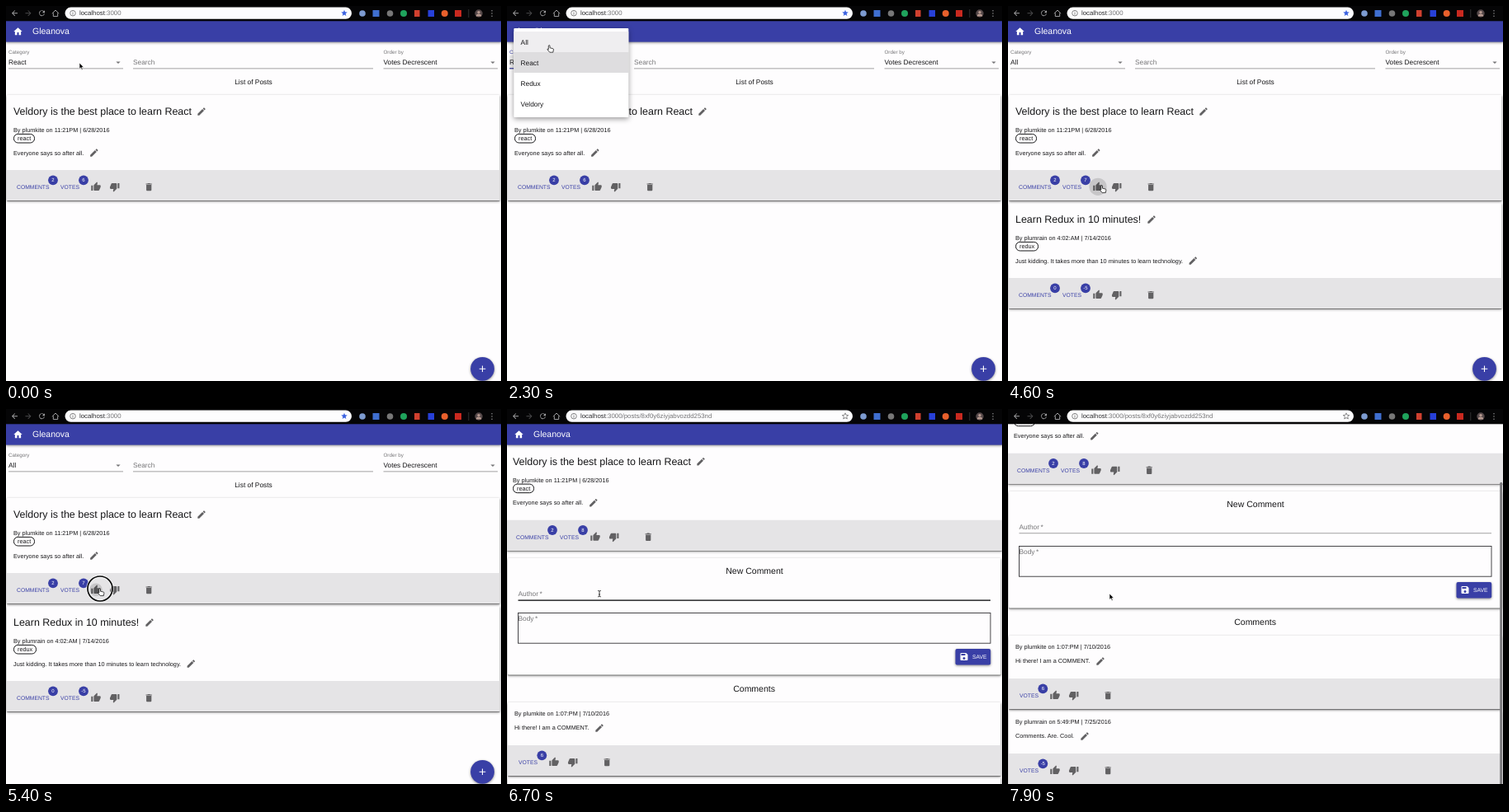
An HTML page for the animation above (8000 ms loop, 600 by 455 pixels).

```html
<!DOCTYPE html>
<html lang="en">
<head>
<meta charset="utf-8">
<title>Post list</title>
<style>
html, body { margin: 0; width: 100%; height: 100%; overflow: hidden; background: #fefdfe; }
svg { display: block; width: 600px; height: 455px; font-family: "Liberation Sans", Arial, Helvetica, sans-serif; }
text { white-space: pre; text-rendering: geometricPrecision; }
.card { fill: #fefdfe; filter: drop-shadow(0 1px .6px rgba(0,0,0,.35)) drop-shadow(0 1.2px 1.6px rgba(0,0,0,.42)); }
.raised { filter: drop-shadow(0 1.6px 1.6px rgba(0,0,0,.45)); }
</style>
</head>
<body>
<svg id="stage" viewBox="0 0 600 455" xmlns="http://www.w3.org/2000/svg"></svg>
<script>
const LOOP = 8000;
const INDIGO = '#393fa6', INK = '#161618', GREY = '#757577', ICON = '#626163';
const SMALL = 7.27, FIELD = 8.3, BUTTON = 6.77, HEAD = 12.46;

const ICONS = {
  up: 'M1 21h4V9H1zM23 10c0-1.1-.9-2-2-2h-6.3l1-4.9-.5-1.1L14.2 1 7.6 7.6Q7 8.2 7 9v10c0 1.1.9 2 2 2h9q1.3 0 1.84-1.22l3-7q.16-.4.16-.78z',
  edit: 'M3 17.25V21h3.75L17.81 9.94l-3.75-3.75zM20.7 7q.6-.7 0-1.4l-2.3-2.3q-.7-.6-1.4 0l-1.85 1.85 3.75 3.75z',
  trash: 'M6 19q0 2 2 2h8q2 0 2-2V7H6zM19 4h-3.5l-1-1h-5l-1 1H5v2h14z',
  home: 'M10 20v-6h4v6h5v-8h3L12 3 2 12h3v8z',
  save: 'M17 3H5q-2 0-2 2v14q0 2 2 2h14q2 0 2-2V7zM12 19a3 3 0 1 1 0-6 3 3 0 0 1 0 6zM15 9H5V5h10z',
  back: 'M20 11H7.8l5.6-5.6L12 4l-8 8 8 8 1.4-1.4L7.8 13H20z',
  reload: 'M17.65 6.35A8 8 0 1 0 19.73 14h-2.08A6 6 0 1 1 16.22 7.78L13 11h7V4z',
  star: 'M12 17.3 18.2 21l-1.7-7 5.5-4.8-7.2-.6L12 2 9.2 8.6 2 9.2 7.5 14 5.8 21z'
};

const text = (x, y, size, str, fill = INK, extra = '') =>
  `<text x="${x}" y="${y}" font-size="${size}" fill="${fill}" ${extra}>${str}</text>`;
const rect = (x, y, w, h, fill, extra = '') =>
  `<rect x="${x}" y="${y}" width="${w}" height="${h}" fill="${fill}" ${extra}/>`;
const disc = (x, y, r, fill, extra = '') =>
  `<circle cx="${x}" cy="${y}" r="${r}" fill="${fill}" ${extra}/>`;
const group = (id, body, extra = '') => `<g id="${id}" ${extra}>${body}</g>`;
const icon = (name, x, y, fill = ICON, size = 12.5, turn = 0, extra = '') =>
  `<path d="${ICONS[name]}" fill="${fill}" fill-rule="evenodd" ${extra}
    transform="translate(${x} ${y}) rotate(${turn}) scale(${size / 24}) translate(-12 -12)"/>`;
const middle = 'text-anchor="middle"';

const badge = (x, y, value, id = '') => disc(x, y, 5.9, INDIGO) +
  text(x, y + 2.1, 6, value, '#fff', middle + (id && ` id="${id}"`));
const voteIcons = (x, y) => icon('up', x, y) + icon('up', x + 22.7, y + .5, ICON, 12.5, 180) + icon('trash', x + 64.2, y + .3);
const chip = (y, label) =>
  rect(9.5, y, 25 + (label === 'redux' ? 2 : 0), 10.6, 'none', `rx="5" stroke="${INK}"`) +
  text(14, y + 7.6, SMALL, label);

function post(p, x = 1, w = 597.5) {
  return rect(x, 108, w, 128, '', 'class="card" rx="1"') + rect(x, 199, w, 37, '#e5e4e6') +
    text(9, 132, HEAD, p.title) + icon('edit', p.titlePen, 128) +
    text(9, 153, SMALL, p.by) + chip(155.4, p.tag) +
    text(9, 180.5, SMALL, p.body) + icon('edit', p.bodyPen, 178) +
    text(13, 222.4, BUTTON, 'COMMENTS', INDIGO) + badge(57, 211.3, p.comments) +
    text(66, 222.4, BUTTON, 'VOTES', INDIGO) + badge(94, 211.3, p.votes, p.id) + voteIcons(109, 219.3);
}

function comment(y, by, body, pen, votes) {
  return group('', rect(1, 356, 597.5, 89, '', 'class="card" rx="1"') + rect(1, 408, 597.5, 37, '#e5e4e6') +
    text(9, 372.3, SMALL, by) + text(9, 389.4, SMALL, body) + icon('edit', pen, 387) +
    text(14, 431.3, BUTTON, 'VOTES', INDIGO) + badge(42.3, 420.3, votes) + voteIcons(57, 428.3),
    `transform="translate(0 ${y})"`);
}

const first = {
  title: 'Veldory is the best place to learn React', titlePen: 237, by: 'By plumkite on 11:21PM | 6/28/2016',
  tag: 'react', body: 'Everyone says so after all.', bodyPen: 106.8, comments: 2, votes: 6
};
const second = {
  title: 'Learn Redux in 10 minutes!', titlePen: 174, by: 'By plumrain on 4:02:AM | 7/14/2016',
  tag: 'redux', body: 'Just kidding. It takes more than 10 minutes to learn technology.', bodyPen: 224.3, comments: 0, votes: -5
};

const caret = x => `<path d="M${x - 2.6} 67.5h5.2l-2.6 2.6z" fill="#757577"/>`;
const underline = (x, w) => rect(x, 75.5, w, .8, '#8b8a8c');
const appBar = rect(0, 18, 600, 25.6, INDIGO, 'class="raised"') +
  icon('home', 14.5, 31, '#fff') + text(32, 34.3, 10.5, 'Gleanova', '#fff');

const fields =
  rect(3, 60, 139, 16, '#eeedef', 'id="selectBg"') +
  text(3, 57.7, 6.25, 'Category', GREY, 'id="catLabel"') + text(3, 71, FIELD, 'React', INK, 'id="category"') +
  caret(136) + underline(3, 139) + rect(3, 75.2, 139, 1.1, INDIGO, 'id="focusLine"') +
  text(154, 71.3, FIELD, 'Search', GREY) + underline(154, 291) +
  text(457.5, 57.7, 6.25, 'Order by', GREY) + text(457.5, 71, FIELD, 'Votes Decrescent') + caret(590) + underline(457.5, 138.5) +
  text(300, 95, 8.4, 'List of Posts', INK, middle);

const menu = rect(8.3, 27, 139, 108, '#fff', 'rx="1" style="filter:drop-shadow(0 2px 3px rgba(0,0,0,.4))"') +
  rect(8.3, 56, 139, 25, '#dedddf') + rect(8.3, 31, 139, 25, '#efeef0', 'id="menuHover"') +
  ['All', 'React', 'Redux', 'Veldory'].map((s, i) => text(16.6, 46.5 + 25 * i, FIELD, s)).join('');

const listPage = appBar + fields +
  group('lower', post(second), 'transform="translate(0 131)"') + post({ ...first, id: 'votes' }) +
  disc(109, 219.3, 12, '#000', 'id="ripple"') +
  disc(577.5, 440.3, 14.4, INDIGO, 'class="raised"') +
  `<path d="M573.7 440.3h7.6M577.5 436.5v7.6" stroke="#fff" stroke-width="1.1"/>` +
  group('menu', menu);

const postPage =
  group('', post({ ...first, votes: 8 }, 2, 600), 'transform="translate(-2 -64.3)"') + appBar +
  rect(1, 181, 597.5, 141.5, '', 'class="card" rx="1"') + text(300, 200.3, 10.5, 'New Comment', INK, middle) +
  text(13.5, 227.3, FIELD, 'Author\u2009*', GREY) + rect(13.5, 231.4, 572.5, 1, INK, 'id="authorLine"') +
  rect(13.5, 247.5, 572.5, 36.7, 'none', 'stroke="#333235" stroke-width=".9"') +
  text(13.5, 256.8, FIELD, 'Body\u2009*', GREY) +
  rect(543.5, 291, 42.7, 19.6, INDIGO, 'rx="2" class="raised"') +
  icon('save', 554, 300.6, '#fff', 12) + text(564, 303.3, BUTTON, 'SAVE', '#fff') +
  text(299.6, 343, 10.5, 'Comments', INK, middle) +
  comment(91, 'By plumrain on 5:49:PM | 7/25/2016', 'Comments. Are. Cool.', 93, -5) +
  comment(0, 'By plumkite on 1:07:PM | 7/10/2016', 'Hi there! I am a COMMENT.', 112, 6);

const extensions = disc(432, 9, 3.8, '#7d9bd0') + rect(444.5, 5, 8, 8, '#3f6fd0') +
  disc(465.5, 9, 3.8, '#777') + disc(482, 9, 4, '#1fa35c') + rect(495, 5, 6.5, 8, '#d0402f') +
  rect(511.5, 5, 7.5, 8, '#2740d8') + disc(531.7, 9, 4, '#e8602c') + rect(544, 5, 8, 8, '#c9291f');
const toolbar = rect(0, 0, 600, 18.3, '#050506') +
  icon('back', 10.5, 8.7, '#a3a3a5', 10.5) + icon('back', 27, 8.7, '#4b4b4d', 10.5, 180) + icon('reload', 43.5, 8.7, '#a3a3a5', 10.5) +
  `<path d="M56 9.2 60 5l4 4.2M57.3 8.5v4.1h5.4V8.5" fill="none" stroke="#a3a3a5"/>` +
  rect(71.5, 1.6, 347.5, 14.2, '#fdfdfe', 'rx="7.1"') +
  disc(81, 8.7, 3.3, 'none', 'stroke="#666" stroke-width=".8"') + rect(80.6, 8.1, .8, 2.5, '#666') + rect(80.6, 6.6, .8, .9, '#666') +
  `<text x="89" y="11.3" font-size="7.83" fill="#2c2c2e">localhost<tspan id="path" fill="#727274"></tspan></text>` +
  icon('star', 410, 8.6, '#3b62e0', 9, 0, 'id="star"') + extensions +
  rect(560.5, 4, .7, 10, '#444') + disc(573, 9, 4.7, '#55494a') + disc(573, 7.6, 1.7, '#b79a90') +
  `<path d="M569.8 12.4a3.2 3 0 0 1 6.4 0z" fill="#b79a90"/>` +
  [5.8, 9, 12.2].map(y => disc(589, y, .7, '#a3a3a5')).join('');

const pointer =
  group('arrow', `<path d="M0 0v7.3l1.7-1.5 1.2 2.7 1.2-.5-1.2-2.7h2.3z" fill="#000" stroke="#fff" stroke-width=".6"/>`) +
  group('hand', `<path d="M-1.2 .5Q-.3-.7.5.5V3.2l3.7.9q.8.2.7 1.2L4.3 8.6H.3L-2.6 5.3q-.1-1 .7-.7l.7.6z" fill="#fff" stroke="#000" stroke-width=".7"/>`) +
  group('beam', `<path d="M-1.8-3.6Q0-3.6 0-2.6 0-3.6 1.8-3.6M0-2.6V2.8M-1.8 3.8Q0 3.8 0 2.8 0 3.8 1.8 3.8M-.9 1h1.8" fill="none" stroke="#222" stroke-width=".9"/>`);

const $ = id => document.getElementById(id);
$('stage').innerHTML = rect(0, 0, 600, 455, '#fefdfe') + group('list', listPage) + group('detail', postPage) +
  rect(596.2, 19, 3, 374, '#7a797c', 'id="scrollbar" rx="1.5"') + toolbar +
  group('pointer', group('press', disc(0, 0, 15, 'none', 'stroke="#fff" stroke-width="3.4" stroke-opacity=".75"') +
    disc(0, 0, 15, 'none', 'stroke="#0a0a0a" stroke-width="1.7"')) + pointer);

const clamp = v => Math.max(0, Math.min(1, v));
const smooth = v => v * v * (3 - 2 * v);
const within = (t, a, b) => t >= a && t < b;
const show = (id, on) => $(id).setAttribute('display', on ? 'inline' : 'none');
const set = (id, name, value) => $(id).setAttribute(name, value);

// Each stop: time, x, y
const ROUTE = [[0, 89, 69], [1000, 89, 69], [1400, 82.3, 70.3], [1900, 82.3, 70.3], [2400, 48, 45], [2800, 48, 45], [3500, 52.3, 138.6],
  [3700, 52.3, 138.6], [4300, 114, 218], [5550, 114, 218], [5900, 33, 220], [6250, 33, 220], [6650, 112, 224], [6900, 112, 224], [7200, 123, 224]];
const SCROLL = [[7050, 0], [7400, 42], [7900, 81]];
const PRESSES = [[1500, 1700], [2500, 2800], [4400, 4600], [5300, 5500], [5950, 6150]];
const HANDS = [[1300, 2900], [4250, 5650], [5800, 6250]];

function along(stops, t, ease) {
  const i = stops.findIndex(s => s[0] > t);
  if (i === 0) return stops[0].slice(1);
  if (i < 0) return stops[stops.length - 1].slice(1);
  const [from, to] = [stops[i - 1], stops[i]];
  const k = ease(clamp((t - from[0]) / (to[0] - from[0])));
  return from.slice(1).map((v, n) => v + (to[n + 1] - v) * k);
}

function render(t) {
  const detail = t >= 6200, all = t >= 2600;
  show('list', !detail);
  show('detail', detail);
  show('lower', all);
  $('category').textContent = all ? 'All' : 'React';
  $('votes').textContent = t < 4600 ? 6 : t < 5500 ? 7 : 8;
  $('path').textContent = ':3000' + (detail ? '/posts/8xf0y6ziyjabvozdd253nd' : '');
  set('star', 'fill', detail ? 'none' : '#3b62e0');
  set('star', 'stroke', detail ? '#666' : 'none');
  set('star', 'stroke-width', 2);

  const focused = within(t, 1500, 4400);
  show('selectBg', focused);
  set('catLabel', 'fill', focused ? INDIGO : GREY);
  const grow = focused ? smooth(clamp((t - 1500) / 215)) : 0;
  set('focusLine', 'x', 72.5 - 69.5 * grow);
  set('focusLine', 'width', 139 * grow);

  const open = smooth(clamp((t - 1680) / 200));
  set('menu', 'opacity', open * (1 - clamp((t - 2600) / 100)));
  set('menu', 'transform', `translate(72 68) scale(${.75 + .25 * open} ${.56 + .44 * open}) translate(-72 -68)`);
  show('menu', within(t, 1690, 2700));
  show('menuHover', t >= 2250);

  const since = t >= 5300 ? t - 5300 : t - 4400;
  const wave = clamp(since / 250);
  set('ripple', 'r', 5 + 7 * wave);
  set('ripple', 'opacity', since < 0 ? 0 : .13 * (1 - clamp((since - 250) / 300)));

  const [scroll] = along(SCROLL, t, k => k);
  set('detail', 'transform', `translate(0 ${-scroll})`);
  show('scrollbar', t > 7050);
  set('scrollbar', 'y', 19 + .86 * scroll);
  const overForm = within(t, 6600, 7600);
  set('authorLine', 'height', overForm ? 1.5 : .8);
  set('authorLine', 'fill', overForm ? '#29282b' : '#8b8a8c');

  const [x, y] = along(ROUTE, t, smooth);
  set('pointer', 'transform', `translate(${x} ${y})`);
  const hand = HANDS.some(h => within(t, ...h));
  show('hand', hand);
  show('beam', overForm);
  show('arrow', !hand && !overForm);
  show('press', PRESSES.some(p => within(t, ...p)));
}

const start = performance.now();
function tick() {
  render((performance.now() - start) % LOOP);
  requestAnimationFrame(tick);
}
tick();
</script>
</body>
</html>
```
